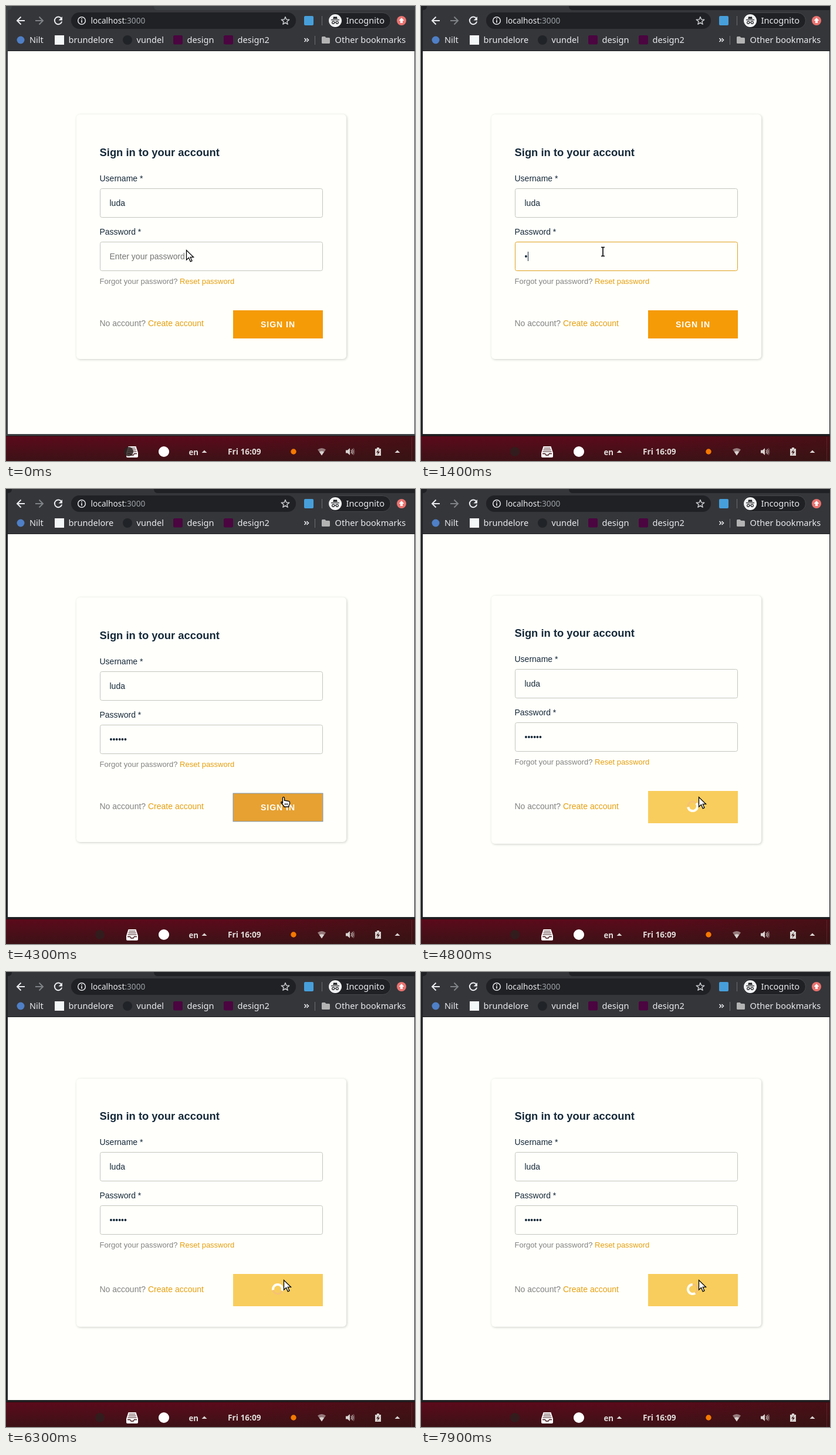
Recreate the animation shown at these times as an HTML page. Size 697x776 px, loop 8000 ms.

```html
<!DOCTYPE html>
<html lang="en">
<head>
<meta charset="utf-8">
<title>Sign in</title>
<style>
  html, body { margin: 0; width: 100%; height: 100%; overflow: hidden; background: #202124; }
  svg { display: block; width: 697px; height: 776px; }
  text { white-space: pre; }
  .ui { font-family: "Noto Sans", "Open Sans", sans-serif; font-size: 14.6px; fill: #e8eaed; }
  .page { font-family: "Liberation Sans", Arial, sans-serif; font-size: 14px; fill: #152939; }
  .page .grey { fill: #828282; }
  .page .link { fill: #e59f0e; }
  .field { fill: #fffffb; stroke: #c4c4bf; }
  .line { fill: none; stroke: #e8eaed; stroke-width: 2; }
  #card { filter: drop-shadow(1px 1px 2px rgba(0, 0, 0, .2)); }
</style>
</head>
<body>
<svg viewBox="0 0 697 776">
  <defs>
    <linearGradient id="wine" x2="0" y2="1">
      <stop stop-color="#5c0a1b"/><stop offset="1" stop-color="#3c1217"/>
    </linearGradient>
    <linearGradient id="shade">
      <stop offset=".55" stop-color="#301510" stop-opacity="0"/><stop offset="1" stop-color="#301510" stop-opacity=".45"/>
    </linearGradient>
  </defs>

  <!-- window -->
  <rect id="frame" width="697" height="734"/>
  <path d="M3 7Q10 7 10 0H252Q252 7 259 7H696V76H3Z" fill="#35363a"/>
  <path d="M3 76.5H696" stroke="#1c1d20"/>
  <rect x="3" y="77" width="693" height="653" fill="#fffffb"/>

  <!-- toolbar -->
  <g class="line">
    <path d="M32 25H19.500M25.500 18.500L19 25L25.500 31.500"/>
    <path d="M50 25H62.500M56.500 18.500L63 25L56.500 31.500" stroke="#7f8286"/>
    <path d="M94.500 21.500A6.300 6.300 0 1 0 95.200 26.500"/>
  </g>
  <path d="M96 18V24.500H89.500Z" fill="#e8eaed"/>
  <rect x="111" y="11" width="383" height="28" rx="14" fill="#202124"/>
  <circle class="line" cx="129" cy="25" r="6.300" style="stroke-width:1.500"/>
  <path d="M129 24V28.500M129 21V22.700" class="line" style="stroke-width:1.700"/>
  <text class="ui" x="144.500" y="30" style="font-size:13.700px">localhost<tspan fill="#9aa0a6">:3000</tspan></text>
  <path id="star" fill="none" stroke="#c4c7cb" stroke-width="1.500" stroke-linejoin="round"/>
  <rect x="508" y="17" width="16" height="16" rx="2" fill="#479fda"/>
  <path d="M538.500 17V33M526.500 51V66" stroke="#6a6d71"/>
  <rect x="548.500" y="11.500" width="107" height="27" rx="13.500" fill="#202124" stroke="#45474b"/>
  <circle cx="561" cy="25" r="11" fill="#f1f3f4"/>
  <g fill="#202124">
    <path d="M557 22L558.500 18Q561 19 563.500 18L565 22ZM554 23H568V24.300H554Z"/>
    <path d="M559.800 28Q561 27 562.200 28" stroke="#202124" fill="none"/>
    <circle cx="557.700" cy="28.200" r="2" fill="none" stroke="#202124" stroke-width="1.200"/>
    <circle cx="564.300" cy="28.200" r="2" fill="none" stroke="#202124" stroke-width="1.200"/>
  </g>
  <text class="ui" x="579.500" y="30">Incognito</text>
  <circle cx="674" cy="25" r="8" fill="#ea7370"/>
  <path d="M674 20L678.500 25H676V29H672V25H669.500Z" fill="#fff"/>

  <!-- bookmarks -->
  <circle cx="25" cy="58" r="6.500" fill="#4f7fc6"/>
  <rect x="83" y="50" width="16" height="16" fill="#f4f7f8"/>
  <circle cx="207" cy="58" r="8" fill="#202327"/>
  <rect x="285" y="50" width="16" height="15.500" rx="2.500" fill="#4b0540"/>
  <rect x="371" y="50" width="16" height="15.500" rx="2.500" fill="#4b0540"/>
  <g class="ui">
    <text x="40" y="63">Nilt</text>
    <text x="106.500" y="63">brundelore</text>
    <text x="222.500" y="63">vundel</text>
    <text x="308.500" y="63">design</text>
    <text x="394.500" y="63">design2</text>
    <text x="560.500" y="63">Other bookmarks</text>
  </g>
  <path class="line" d="M508.500 55L511.500 58L508.500 61M512.500 55L515.500 58L512.500 61" style="stroke-width:1.600"/>
  <path d="M538 53.500Q538 52 539.500 52H543.500L545.500 54H550.500Q552 54 552 55.500V62.500Q552 64 550.500 64H539.500Q538 64 538 62.500Z" fill="#b3b3b3"/>

  <!-- form -->
  <g class="page">
    <rect id="card" x="120" width="460" rx="6" fill="#fffffb"/>
    <g id="fields">
      <text x="159.500" y="256" font-weight="bold" style="font-size:18.400px">Sign in to your account</text>
      <text x="159.500" y="299">Username *</text>
      <rect class="field" x="160.500" y="311.500" width="379" height="49" rx="3"/>
      <text x="176.500" y="341">luda</text>
      <text x="159.500" y="390">Password *</text>
      <rect class="field" id="pass" x="160.500" y="402.500" width="379" height="49" rx="3"/>
      <text id="value" x="176.500" y="432"></text>
      <rect id="caret" y="419" width="1" height="16"/>
      <text class="grey" x="159.500" y="474" style="font-size:13px">Forgot your password? <tspan class="link">Reset password</tspan></text>
    </g>
    <text class="grey" x="159.500" y="546">No account? <tspan class="link">Create account</tspan></text>
    <rect id="button" x="387" width="153"/>
    <text id="label" x="434" y="548" font-weight="bold" letter-spacing="1" fill="#fffffb">SIGN IN</text>
    <g id="spinner" fill="none" stroke-width="4">
      <circle r="8" stroke="#f6c174" stroke-width="3"/>
      <path d="M-7.700 2.100A8 8 0 1 1 7.700 2.100" stroke="#fffdf4"/>
    </g>
  </g>

  <!-- system tray -->
  <rect y="733" width="697" height="43" fill="url(#wine)"/>
  <rect y="733" width="697" height="43" fill="url(#shade)"/>
  <path d="M0 733.500H697" stroke="#2a1014"/>
  <path d="M691.500 735V776" stroke="#6b3038" opacity=".6"/>
  <g fill="#fff">
    <path d="M208.500 751H221.500L225 762V768Q225 770 223 770H207Q205 770 205 768V762Z"/>
    <path d="M209.500 754H220.500M208.500 757H221.500M207.500 760H222.500" stroke="#3c1217" stroke-width="1.200"/>
    <path d="M207 763.500H211.500L213 766H217L218.500 763.500H223" fill="none" stroke="#3c1217" stroke-width="1.300"/>
    <circle cx="269" cy="760" r="9"/>
  </g>
  <circle id="app" cy="760" r="8" fill="#2b2220"/>
  <g class="ui" font-weight="bold" style="fill:#dfdbd8">
    <text x="311.500" y="766" font-weight="600" style="font-size:13.300px">en</text>
    <text x="378" y="765" style="font-size:13.700px">Fri 16:09</text>
  </g>
  <g fill="#d8d3d0">
    <path d="M333.500 762L338 757.500L342.500 762ZM662.500 762L667 757.500L671.500 762Z"/>
    <path d="M531 756.500Q538 751.500 545 756.500L538 766.500Z" opacity=".55"/>
    <path d="M534 760.500Q538 758 542 760.500L538 766.500Z"/>
    <path d="M579 757.500H582L586 754V766L582 762.500H579Z"/>
    <path d="M588 757Q590 760 588 763M590 755.500Q593 760 590 764.500" fill="none" stroke="#d8d3d0" stroke-width="1.200"/>
    <path d="M592 754Q595.500 760 592 766" fill="none" stroke="#d8d3d0" opacity=".5"/>
    <path d="M629 755H632V753H636V755H639V767H629Z"/>
    <path d="M635.500 756L631 761.500H634L632.500 766L637 760H634Z" fill="#3c1217"/>
  </g>
  <circle cx="490" cy="760" r="4.700" fill="#f57900"/>

  <!-- pointers, each with its hot spot at 0,0 -->
  <g id="arrow"><path d="M.5 .5V17L4.500 13.300L7.300 19.800L10 18.600L7.200 12.300H12.500Z" fill="#fff" stroke="#000" stroke-width="1.300"/></g>
  <g id="beam" fill="none">
    <path id="bar" d="M-3 -7.500H-1Q0 -7.500 0 -6.500Q0 -7.500 1 -7.500H3M0 -7V7M-3 7.500H-1Q0 7.500 0 6.500Q0 7.500 1 7.500H3" stroke="#fff" stroke-width="3.500"/>
    <use href="#bar" style="stroke:#000"/>
    <path d="M-3 -7.500H3M0 -7.500V7.500M-3 7.500H3" stroke="#000" stroke-width="1.600"/>
  </g>
  <g id="hand">
    <path d="M-1.500 10V1Q-1.500 -.5 0 -.5T1.500 1V5.500Q3 4.500 4.500 6Q6 5 7.500 6.500Q10.500 6 10.500 8.500V11.500L9 14V16H.5V14.500L-4 9.500Q-4.500 7.500 -3 7.500Z" fill="#fff" stroke="#000" stroke-width="1.300" stroke-linejoin="round"/>
    <path d="M2.500 10V13M4.700 10V13M6.900 10V13" stroke="#000"/>
  </g>
</svg>
<script>
const $ = id => document.getElementById(id);
const set = (id, attrs) => { for (const k in attrs) $(id).setAttribute(k, attrs[k]); };
const show = (id, on) => set(id, { visibility: on ? 'visible' : 'hidden' });
const during = (t, a, b) => t >= a && t < b;

const keys = [1400, 1700, 1900, 2200, 2400, 2500];
// start time, pointer, hot spot
const moves = [
  [0, 'arrow', 307, 416], [100, 'beam', 310, 419], [3400, 'arrow', 388, 474],
  [3500, 'arrow', 450, 511], [3600, 'hand', 473, 526], [4600, 'arrow', 473, 525]
];

set('star', { d: 'M' + Array.from({ length: 10 }, (_, i) => {
  const a = i * Math.PI / 5, r = i % 2 ? 3 : 7;
  return (476 + r * Math.sin(a)).toFixed(1) + ' ' + (25.5 - r * Math.cos(a)).toFixed(1);
}).join('L') + 'Z' });

function draw(t) {
  const typed = keys.filter(k => t >= k).length;
  const loading = t >= 4600, pressed = during(t, 4300, 4600), focused = during(t, 700, 4300);

  const fade = Math.min(1, Math.max(0, (t - 500) / 300));
  const mix = (a, b) => Math.round(a + (b - a) * fade);
  set('frame', { fill: `rgb(${mix(60, 32)},${mix(64, 33)},${mix(67, 36)})` });
  set('app', { cx: t < 100 ? 209 : 160, opacity: t < 100 ? .85 : .7 });

  set('card', loading ? { y: 182, height: 423 } : { y: 185, height: 417 });
  set('fields', { transform: `translate(0 ${loading ? -4 : 0})` });
  $('pass').style.stroke = focused ? '#e0a01c' : '';
  $('value').textContent = typed ? '•'.repeat(typed) : 'Enter your password';
  $('value').style.fill = typed ? '' : '#757575';
  set('caret', { x: Math.floor(177.3 + 4.9 * typed) });
  show('caret', focused && !during(t, 3200, 3800));

  set('button', {
    y: loading ? 515 : 519, height: loading ? 55 : 48,
    fill: loading ? '#f8cd5d' : pressed ? '#e6a132' : t >= 3600 ? '#f6ae36' : '#f59b07',
    stroke: pressed ? '#7d98b8' : 'none'
  });
  show('label', !loading);
  show('spinner', loading);
  set('spinner', { transform: `translate(463 541) rotate(${(t - 6300) * .38 + 5})` });

  const [, kind, x, y] = moves.filter(m => t >= m[0]).pop();
  for (const id of ['arrow', 'beam', 'hand']) show(id, id === kind);
  set(kind, { transform: `translate(${x} ${y})` });
}

function tick() {
  draw(Math.floor(performance.now() % 8000 / 100) * 100);
  requestAnimationFrame(tick);
}
tick();
</script>
</body>
</html>
```
